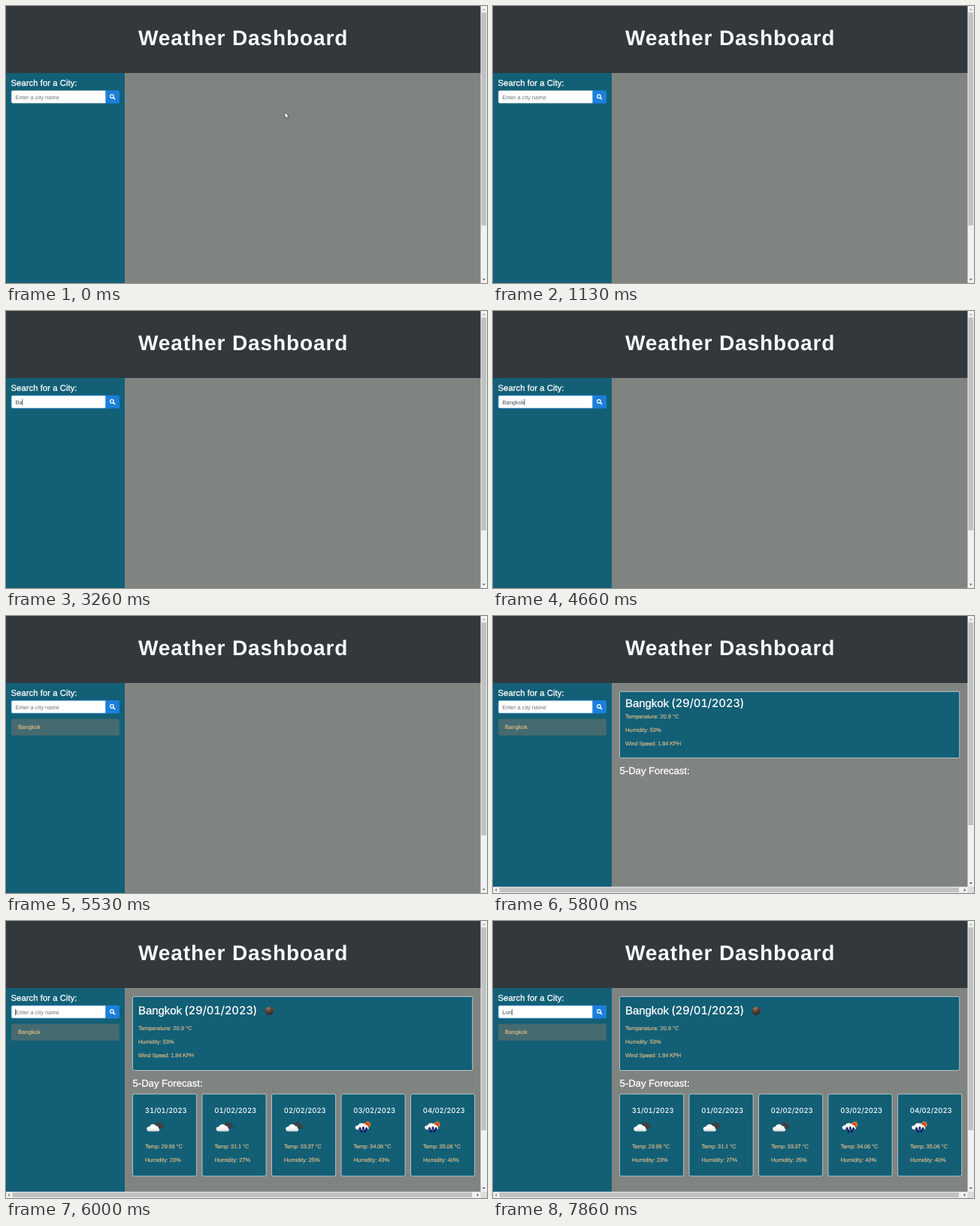
An HTML page that plays this animation: 640x368 px, repeating every 8000 ms.

```html
<!DOCTYPE html>
<html lang="en">
<head>
<meta charset="utf-8">
<title>Weather Dashboard</title>
<style>
  html, body { margin: 0; width: 100%; height: 100%; overflow: hidden; background: #7f8481; }
  svg { display: block; width: 100vw; height: 100vh; }
  text { font: 7.5px "Liberation Sans", Arial, sans-serif; text-rendering: geometricPrecision; white-space: pre; }
  .title { font-size: 28.1px; font-weight: 700; letter-spacing: .85px; fill: #f8f9fa; }
  .head { fill: #fff; stroke: #fff; stroke-width: .3px; }
  .date { font-family: Inter, sans-serif; font-weight: 500; font-variant-numeric: tabular-nums; fill: #fff; }
  .info { fill: #e9bf87; stroke: #e9bf87; stroke-width: .12px; }
  .panel { fill: #125f76; stroke: #e8f0f2; stroke-width: .65px; }
</style>
</head>
<body>
<svg viewBox="0 0 640 368" preserveAspectRatio="none">
  <defs>
    <radialGradient id="moon" cx=".4" cy=".15" r=".85">
      <stop offset="0" stop-color="#a87a68"/>
      <stop offset=".5" stop-color="#5a4238"/>
      <stop offset="1" stop-color="#2c2826"/>
    </radialGradient>
    <linearGradient id="puff" x2="0" y2="1">
      <stop offset=".45" stop-color="#fff"/>
      <stop offset="1" stop-color="#d9dbde"/>
    </linearGradient>
    <path id="cloud" d="M3.5 12.5a3.4 3.4 0 0 1 .2-6.8A5 5 0 0 1 12.8 4.800A3.1 3.1 0 0 1 16 8.200A2.300 2.300 0 0 1 15.600 12.500Z"/>
    <g id="cloudy">
      <use href="#cloud" transform="translate(7.500 -1.200) scale(.88 .85)" fill="#3e4043"/>
      <use href="#cloud" transform="translate(-.5 1.500) scale(1 .92)" fill="url(#puff)"/>
    </g>
    <g id="rain">
      <path d="M16 -1l1 2 2.200-.8-.4 2.300 2.200 1-2 1.300 1 2.100-2.400 0-.6 2.200-5-4 0-3.200 2.800-.8Z" fill="#f5a13c"/>
      <circle cx="16" cy="3.900" r="2.900" fill="#e8431f"/>
      <use href="#cloud" transform="translate(-.5 .2) scale(1.060 .86)" fill="url(#puff)"/>
      <g fill="#10176e">
        <path id="drop" d="M6 6.800q3.200 3.800 0 4.700q-3.200-.9 0-4.700Z"/>
        <use href="#drop" x="4.400" y="-.6"/>
        <use href="#drop" x="8.600" y=".4"/>
        <use href="#drop" x="2" y="3.600"/>
        <use href="#drop" x="6.400" y="3.400"/>
      </g>
    </g>
  </defs>

  <rect width="640" height="368" fill="#7f8481"/>
  <rect y="89" width="158" height="279" fill="#125f76"/>
  <rect width="632" height="89" fill="#33383c"/>
  <text class="title" x="176" y="52">Weather Dashboard</text>
  <text class="head" x="6.500" y="106" style="font-size:11.24px;letter-spacing:.07px">Search for a City:</text>

  <rect id="ring" x="5.900" y="111.100" width="127.500" height="19.500" rx="3" fill="#0f6288"/>
  <path d="M132 112h17q2 0 2 2v13.500q0 2-2 2h-17Z" fill="#1b80da"/>
  <path id="field" d="M132.200 112.400H9q-1.700 0-1.700 1.700v13.200q0 1.700 1.700 1.700h123.200Z" fill="#fff" stroke-width=".6"/>
  <g fill="none" stroke="#fff" stroke-linecap="round">
    <circle cx="140.900" cy="120" r="2.300" stroke-width="1.200"/>
    <path d="M142.800 121.900l1.900 1.900" stroke-width="1.500"/>
  </g>
  <text id="typed" x="12.500" y="123.700"></text>
  <rect id="caret" y="117" width=".8" height="8.400" fill="#33383d"/>

  <g id="history">
    <rect x="7" y="136.800" width="144" height="22" rx="2" fill="#456b70" stroke="#38646c" stroke-width=".6"/>
    <text class="info" x="16" y="150" style="letter-spacing:.1px">Bangkok</text>
  </g>

  <g id="today">
    <rect id="todayBox" class="panel" x="168.500" y="100.400" width="452.200" rx="2"/>
    <g id="heading">
      <text class="head" x="176" y="121" style="font-size:15px;letter-spacing:-.06px">Bangkok</text>
      <text class="date" x="237" y="121" style="font-size:15px;letter-spacing:-.28px">(29/01/2023)</text>
    </g>
    <g id="facts">
      <text class="info" x="176" y="135.700">Temperature: 20.9 °C</text>
      <text class="info" x="176" y="153.600" style="letter-spacing:-.06px">Humidity: 53%</text>
      <text class="info" x="176" y="171.500" style="letter-spacing:-.15px">Wind Speed: 1.84 KPH</text>
      <text class="head" x="168.500" y="210.200" style="font-size:13.100px">5-Day Forecast:</text>
    </g>
    <g id="moonIcon">
      <path d="M350 115.500q1.500-2 3.500-1.200q3 .2 3 2.400q1.500 2.300-1 3.600h-5Z" fill="#4d4c4b"/>
      <circle cx="350" cy="119.600" r="5.500" fill="url(#moon)"/>
    </g>
  </g>
  <g id="cards"></g>

  <g id="bars">
    <rect x="631.500" width="8.500" height="368" fill="#f1f1f1"/>
    <rect id="vThumb" x="632.500" y="8.500" width="6.500" fill="#c1c1c1"/>
    <path d="M633.800 5.500l2-2.200 2 2.200Z" fill="#a3a3a3"/>
    <path id="down" d="M633.800 -1l2 2.200 2-2.200Z" fill="#505050"/>
    <g id="hBar">
      <rect y="359.700" width="632" height="8.300" fill="#f1f1f1"/>
      <rect x="631.500" y="359.700" width="8.500" height="8.300" fill="#dcdcdc"/>
      <rect x="8.500" y="360.700" width="611.500" height="6.300" fill="#c1c1c1"/>
      <path d="M5 361.900l-2.200 2 2.200 2Z" fill="#707070"/>
      <path d="M626.700 361.900l2.200 2-2.200 2Z" fill="#505050"/>
    </g>
  </g>

  <path id="mouse" d="M0 0v8l1.900-1.700 1.300 2.900 1.300-.6-1.300-2.800h2.500Z" fill="#fff" stroke="#222" stroke-width=".6"/>
</svg>
<script>
const LOOP = 8000;
const FOCUS = 1660, SEARCH = 5530, RESULT = 5800, FORECAST = 5860;
const $ = id => document.getElementById(id);

// [time, field text, caret visible]
const field = [
  [0, "", 0], [FOCUS, "", 1], [2200, "", 0], [2730, "", 1],
  [2930, "B", 1], [3260, "Ba", 1], [3460, "Ban", 1], [3660, "Bang", 1], [4200, "Bang", 0],
  [4260, "Bangk", 1], [4460, "Bangko", 1], [4660, "Bangkok", 1], [5330, "Bangkok", 0],
  [SEARCH, "", 0], [FORECAST, "", 1], [6400, "", 0], [6930, "", 1],
  [7400, "L", 1], [7600, "Lo", 1], [7860, "Lon", 1]
];

// [date, temperature, humidity, icon, icon load time]
const days = [
  ["31/01/2023", "29.99", 23, "cloudy", 5930],
  ["01/02/2023", "31.1", 27, "cloudy", 5930],
  ["02/02/2023", "33.37", 25, "cloudy", 5930],
  ["03/02/2023", "34.06", 43, "rain", 6000],
  ["04/02/2023", "35.06", 40, "rain", 6000]
];

$("cards").innerHTML = days.map(([date, temp, humidity, icon], i) => `
  <g transform="translate(${168.5 + i * 92.5} 229.9)">
    <rect class="panel" width="85.1" height="109" rx="2"/>
    <text class="date" x="16.3" y="24.8" style="font-size:9.37px;letter-spacing:.04px">${date}</text>
    <use class="icon" href="#${icon}" x="19" y="36.5"/>
    <text class="info" x="16.5" y="72.1" style="letter-spacing:-.15px">Temp: ${temp} °C</text>
    <text class="info" x="16.5" y="90" style="letter-spacing:-.06px">Humidity: ${humidity}%</text>
  </g>`).join("");
const icons = [...document.querySelectorAll(".icon")];

const show = (el, on) => el.setAttribute("visibility", on ? "inherit" : "hidden");
const shift = (el, x, y) => el.setAttribute("transform", `translate(${x} ${y})`);

function drawField(t) {
  const [, text, caretOn] = field.findLast(step => step[0] <= t);
  const typed = $("typed");
  typed.textContent = text || "Enter a city name";
  typed.setAttribute("fill", text ? "#495057" : "#6c757d");
  $("caret").setAttribute("x", 12.3 + (text ? typed.getComputedTextLength() : 0));
  show($("caret"), caretOn);
  show($("ring"), t >= FOCUS);
  $("field").setAttribute("stroke", t >= FOCUS ? "#80bdff" : "#ced4da");
}

function drawMouse(t) {
  const step = t < 60 ? 0 : Math.min(13, 1 + Math.floor((t - 60) / 66.6));
  const p = step / 13, k = p * p * (3 - 2 * p);
  const x = 371 - 265 * k;
  shift($("mouse"), x, 141 - 20 * k);
  show($("mouse"), x > 132);
}

function drawResults(t) {
  const found = t >= RESULT, full = t >= FORECAST;
  show($("history"), t >= SEARCH);
  show($("today"), found);
  show($("moonIcon"), full);
  show($("cards"), full);
  $("todayBox").setAttribute("height", full ? 98.1 : 88.2);
  shift($("heading"), 0, full ? 3.4 : 0);
  shift($("facts"), 0, full ? 9.6 : 0);
  icons.forEach((icon, i) => show(icon, full && t >= days[i][4]));

  show($("hBar"), found);
  $("vThumb").setAttribute("height", found ? 269.5 : 283);
  shift($("down"), 0, found ? 355 : 363.4);
}

function draw(t) {
  drawField(t);
  drawMouse(t);
  drawResults(t);
}

const start = performance.now();
function tick() {
  draw((performance.now() - start) % LOOP);
  requestAnimationFrame(tick);
}
tick();
</script>
</body>
</html>
```
